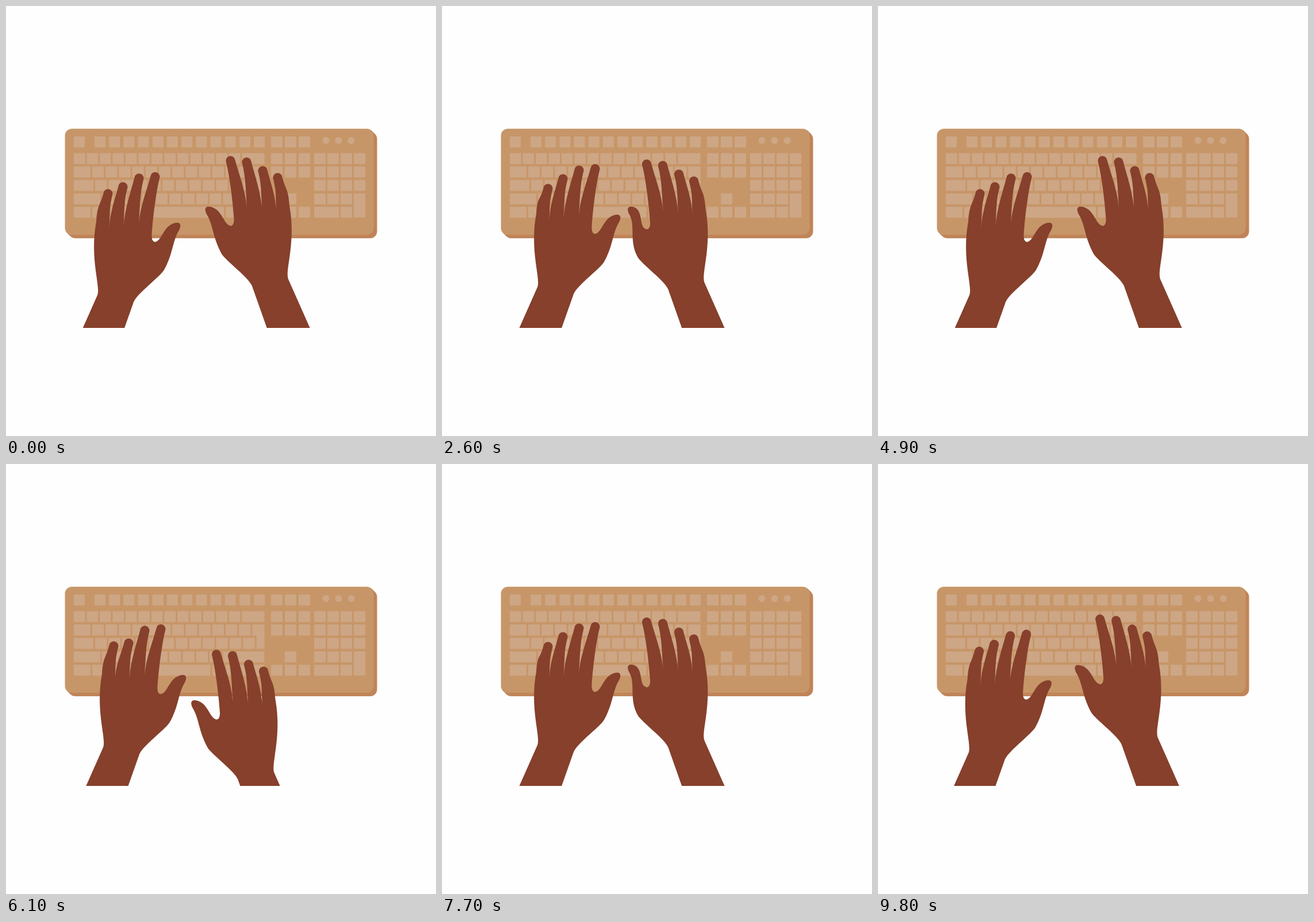
Recreate the animation shown at these times as an HTML page. Size 748x748 px, loop 9.9 s.

```html
<!DOCTYPE html>
<html lang="en">
<head>
<meta charset="utf-8">
<title>Typing hands</title>
<style>
  html, body { margin: 0; width: 100%; height: 100%; overflow: hidden; background: #fefefe; }
  svg { display: block; width: 100%; height: 100%; }
</style>
</head>
<body>
<svg viewBox="0 0 748 748">
  <defs><clipPath id="desk"><rect width="748" height="560"/></clipPath></defs>
  <g id="board"></g>
  <g clip-path="url(#desk)" fill="#86402c">
    <path id="left"/>
    <path id="right"/>
  </g>
</svg>
<script>
const BODY = '#c79668', SIDE = '#c08459', KEY = '#cda685';
const $ = id => document.getElementById(id);

function add(tag, attrs) {
  const el = document.createElementNS('http://www.w3.org/2000/svg', tag);
  for (const k in attrs) el.setAttribute(k, attrs[k]);
  $('board').append(el);
}
const rect = (x, y, width, height, fill = KEY, rx = 1) =>
  add('rect', { x, y, width, height, fill, rx });
const key = (x, y, w = 20, h = 19) => rect(x, y, w, h);
function row(x, y, n, pitch, w) {
  for (let i = 0; i < n; i++) key(x + i * pitch, y, w);
}

function drawBoard() {
  const x0 = 118, x1 = 449.5, gap = 3;
  const rowY = r => 256 + 23.3 * r;

  for (let i = 6; i >= 0; i--) rect(102.5 + i, 213.5 + i, 537, 184.5, i ? SIDE : BODY, 12);

  // Function keys and lamps
  key(x0, 227, 19);
  row(154, 227, 12, 25.2, 19);
  for (let i = 0; i < 3; i++) add('circle', { cx: 556.5 + 22 * i, cy: 234, r: 6, fill: KEY });

  // Letter rows: a lead key, even keys, and a last key that fills the rest
  [[19.5, 12, 22.5], [29, 12, 23.2], [34, 12, 23.4], [46, 10, 23.4]].forEach(([lead, n, pitch], r) => {
    const start = x0 + lead + gap, end = start + n * pitch;
    key(x0, rowY(r), lead);
    row(start, rowY(r), n, pitch, pitch - gap);
    key(end, rowY(r), x1 - end);
  });
  rect(436, rowY(1.5), x1 - 436, 20);
  row(x0, rowY(4), 3, 32, 29);
  key(214, rowY(4), 141.5);
  row(359, rowY(4), 4, 23.3);

  // Navigation block and number pad
  for (const y of [227, rowY(0), rowY(1), rowY(4)]) row(461, y, 3, 24);
  key(485, rowY(3));
  for (let r = 0; r < 4; r++) row(536, rowY(r), r < 3 ? 4 : 3, 23);
  key(605, rowY(3), 20, 42);
  key(536, rowY(4), 43);
  key(582, rowY(4));
}

// One hand; the other is its mirror image.
const webs = [[157, 375], [179.5, 386], [204.5, 383], [231, 379], [253.5, 398]];
const tips = [[177.5, 326.5], [203.5, 314.5], [231.5, 299.5], [259.5, 297]];
const R = 8, UX = 0.25, UY = -0.97;

// A finger rises from one web to a round tip and falls to the next web.
function finger([ax, ay], [x, y], [bx, by]) {
  const lx = x + R * UY, ly = y - R * UX, rx = x - R * UY, ry = y + R * UX;
  const dx = 25 * UX, dy = 25 * UY;
  return `C${ax + 2} ${ay - 30} ${lx - dx} ${ly - dy} ${lx} ${ly}` +
    `A${R} ${R} 0 0 1 ${rx} ${ry}` +
    `C${rx - dx} ${ry - dy} ${bx + 2} ${by - 30} ${bx} ${by}`;
}

function handPath(pinky, ring, thumb) {
  const drop = [pinky, ring, 0, 0];
  const fingers = tips.map(([x, y], i) => finger(webs[i], [x, y + drop[i]], webs[i + 1]));
  const p = (x, y) => `${x - 11 * thumb} ${y - 6 * thumb} `;
  return 'M116 600L159 503C165 488 145 440 157 375' + fingers.join('') +
    `C253 408 257 413 263 409C273 402 ${p(276, 380)}${p(296, 377)}` +
    `C${p(304, 376)}${p(305, 382)}${p(301, 390)}` +
    `C${p(289, 410)}291 430 275 459C268 471 228 500 222 515L192 600Z`;
}

// Each pose is held until the move to the next one begins.
const PERIOD = 4950, STEP = 100, MOVE = 550;
const rest = [0, 0, 0, 0, 0, 0, 0];
const poses = [ // left x y, right x y, ring, pinky, thumb
  { at: 0, v: rest },
  { at: 1150, v: [10, -10, -24.5, 62, 7, 0, 0] },
  { at: 2200, v: [7, -14, -34.5, 6, 0, 5, 1] },
  { at: 3600, v: [-8, -4, -25, 4.5, 0, 0, 0] },
  { at: 4900, v: rest }
];

function poseAt(t) {
  const i = poses.findIndex(p => p.at > t);
  if (i < 0) return rest;
  const u = Math.max(0, 1 - (poses[i].at - t) / MOVE);
  return poses[i - 1].v.map((a, k) => a + (poses[i].v[k] - a) * u * u);
}

function frame() {
  const now = performance.now() % (2 * PERIOD);
  const t = Math.floor(now / STEP) * STEP % PERIOD;
  const [lx, ly, rx, ry, ring, pinky, thumb] = poseAt(t);
  $('left').setAttribute('d', handPath(pinky, ring, 0));
  $('left').setAttribute('transform', `translate(${lx} ${ly})`);
  $('right').setAttribute('d', handPath(0, 0, thumb));
  $('right').setAttribute('transform', `translate(${650 + rx} ${ry - 28}) scale(-1 1)`);
  requestAnimationFrame(frame);
}

drawBoard();
frame();
</script>
</body>
</html>
```
